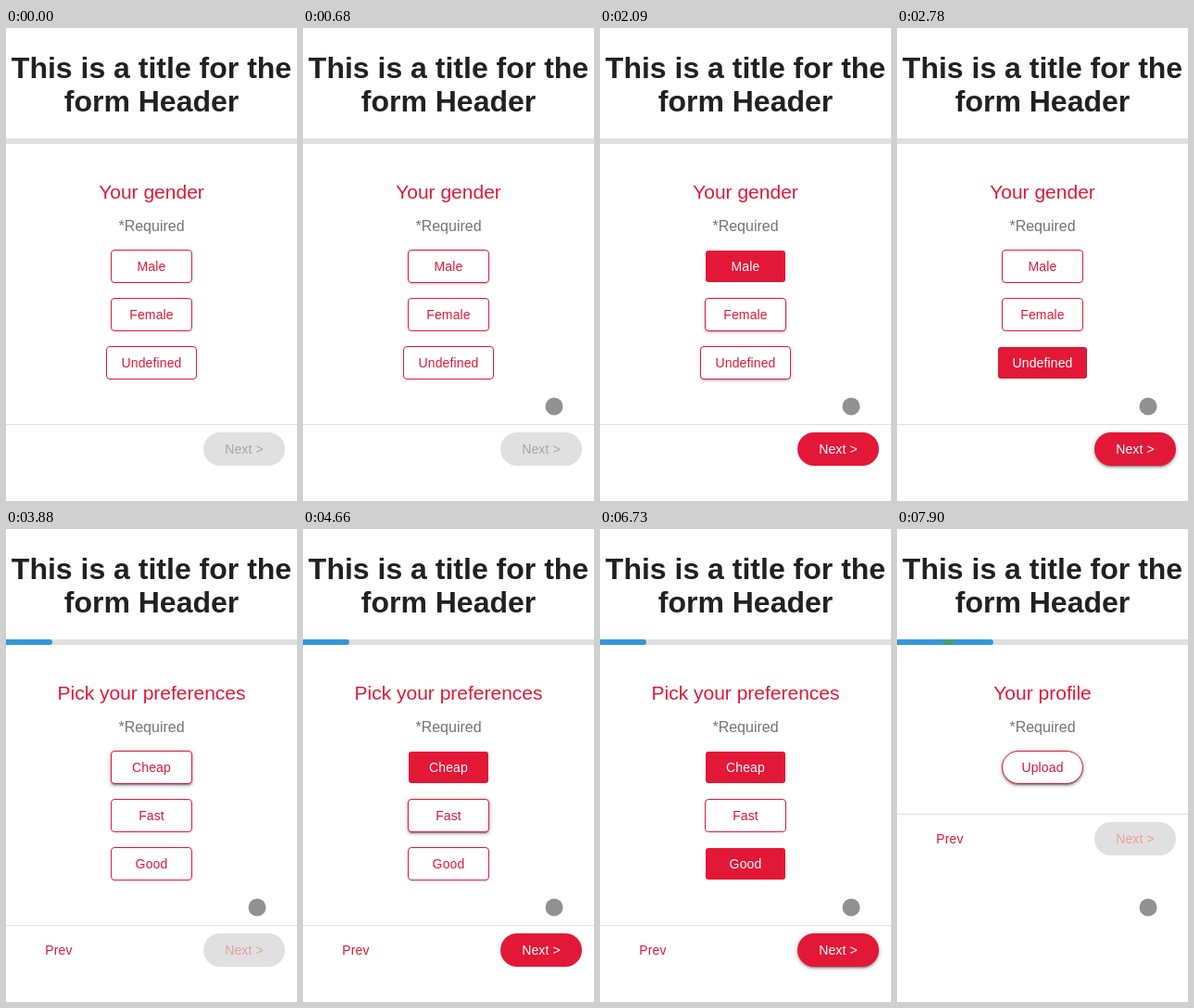
Write an HTML page that moves like this. It is 314x510 px and loops after 8 s.

```html
<!DOCTYPE html>
<html lang="en">
<head>
<meta charset="utf-8">
<title>Form wizard</title>
<style>
  :root { --red: #e31837; --grey: #e0e0e0; }
  html, body { margin: 0; width: 100%; height: 100%; overflow: hidden; background: #fff; }
  body { position: relative; font-family: "Liberation Sans", Arial, sans-serif; }
  body * { position: absolute; box-sizing: border-box; margin: 0; white-space: nowrap; }
  h1, h2, p { left: 0; width: 314px; text-align: center; }
  h1 { top: 25px; font: bold 32px/36px "Liberation Sans", Arial, sans-serif; color: #212121; }
  h1 br { position: static; }
  h2 { top: 165px; font-size: 21px; font-weight: 400; line-height: 23px; color: var(--red); }
  p { top: 205px; font-size: 16px; line-height: 17px; color: #757575; }
  #track { left: 0; top: 119px; width: 314px; height: 6px; background: var(--grey); }
  #bar { left: 0; top: 0; height: 6px; background: #3498db; border-radius: 0 3px 3px 0; }
  #tint { left: 50px; top: 0; width: 11px; height: 6px; background: #41a07c; }
  .btn {
    left: 113px; width: 88px; height: 36px; border: 1px solid var(--red); border-radius: 4px;
    background: #fff padding-box; color: var(--red);
    font-size: 14px; line-height: 34px; letter-spacing: .13px; text-align: center;
    box-shadow: 0 3px 1px -2px rgba(0, 0, 0, calc(.2 * var(--lift, 0))),
                0 2px 2px 0 rgba(0, 0, 0, calc(.14 * var(--lift, 0))),
                0 1px 5px 0 rgba(0, 0, 0, calc(.3 * var(--lift, 0)));
  }
  .btn.on { background-color: var(--red); border-color: transparent; color: #fff; }
  .pill { border-radius: 18px; }
  #foot { left: 0; top: 427px; width: 314px; height: 46px; border-top: 1px solid var(--grey); }
  #foot .btn { top: 8px; border: 0; line-height: 36px; }
  #prev { left: 13px; }
  #foot #next { left: 213px; background: var(--grey); }
  #foot #next.on { background: var(--red); }
  #dot { left: -9.5px; top: -9.5px; width: 19px; height: 19px; border-radius: 50%; background: #919191; }
</style>
</head>
<body>
<h1>This is a title for the<br>form Header</h1>
<div id="track"><div id="bar"></div><div id="tint"></div></div>
<h2 id="ask"></h2>
<p>*Required</p>
<div class="btn" id="opt0" style="top:239px"></div>
<div class="btn" id="opt1" style="top:291px"></div>
<div class="btn" id="opt2" style="top:343px"></div>
<div id="foot">
  <div class="btn pill" id="prev">Prev</div>
  <div class="btn pill" id="next">Next &gt;</div>
</div>
<div id="dot"></div>
<script>
const LOOP = 8000;
const $ = id => document.getElementById(id);
const show = (el, yes) => { el.style.visibility = yes ? 'visible' : 'hidden'; };

const pages = [
  { at: 0, ask: 'Your gender', opts: ['Male', 'Female', 'Undefined'], off: '#a6a6a6', bar: 0 },
  { at: 3100, ask: 'Pick your preferences', opts: ['Cheap', 'Fast', 'Good'], off: '#e0a0a0', bar: 50 },
  { at: 7050, ask: 'Your profile', opts: ['Upload'], off: '#eb9f92', bar: 104 }
];

// option index, selected from, selected until
const picks = [[0, 1150, 2400], [2, 2400, 3100], [0, 4030, 7050], [2, 5660, 7050]];

// button, fade in [first, last, steps], fade out [first, last, steps]
const hovers = [
  ['opt0', [680, 840, 3], [1610, 1700, 2]],
  ['opt1', [1610, 1700, 2], [2090, 2170, 2]],
  ['opt2', [2090, 2170, 2], [2780, 2780, 1]],
  ['next', [2780, 2780, 1], [3100, 3250, 3]],
  ['opt0', [3800, 3880, 2], [4580, 4660, 2]],
  ['opt1', [4580, 4660, 2], [5190, 5270, 2]],
  ['opt2', [5190, 5270, 2], [6130, 6190, 2]],
  ['prev', [6130, 6190, 2], [6670, 6730, 2]],
  ['next', [6670, 6730, 2], [7050, 7200, 3]],
  ['opt0', [7750, 7900, 3], [LOOP, LOOP, 1]]
];

// number of steps taken so far
function count(t, [first, last, n]) {
  if (t < first) return 0;
  if (t >= last) return n;
  return 1 + Math.floor((t - first) / (last - first) * (n - 1));
}
const level = (t, span) => count(t, span) / span[2];

function draw(t) {
  const n = pages.filter(p => t >= p.at).length - 1;
  const page = pages[n];
  const chosen = picks.filter(([, a, b]) => t >= a && t < b).map(p => p[0]);

  $('ask').textContent = page.ask;
  for (let i = 0; i < 3; i++) {
    const el = $('opt' + i), text = page.opts[i] || '';
    const wide = text === 'Undefined';
    el.textContent = text;
    show(el, text);
    el.style.left = wide ? '108px' : '113px';
    el.style.width = wide ? '98px' : '88px';
    el.classList.toggle('on', chosen.includes(i));
    el.classList.toggle('pill', n === 2);
  }

  const ready = chosen.length > 0;
  $('next').classList.toggle('on', ready);
  $('next').style.color = ready ? '#fff' : page.off;
  show($('prev'), n > 0);
  $('foot').style.top = n === 2 ? '307px' : '427px';

  const from = n ? pages[n - 1].bar : 0;
  const grow = [0, .2, .65, 1][count(t, [page.at, page.at + 150, 3])];
  $('bar').style.width = from + (page.bar - from) * grow + 'px';
  show($('tint'), n === 2);

  const lift = {};
  for (const [id, a, b] of hovers) lift[id] = (lift[id] || 0) + level(t, a) - level(t, b);
  for (const id in lift) $(id).style.setProperty('--lift', lift[id]);

  const k = count(t, [140, 450, 5]);
  const left = 1 - (k - 1) / 4;
  show($('dot'), k > 0);
  $('dot').style.transform = `translate(${270.5 - 8 * left * left}px, ${407.5 - -77 * left * left}px)`;
}

const start = performance.now();
function tick(now) {
  draw(Math.max(0, now - start) % LOOP);
  requestAnimationFrame(tick);
}
draw(0);
requestAnimationFrame(tick);
</script>
</body>
</html>
```
